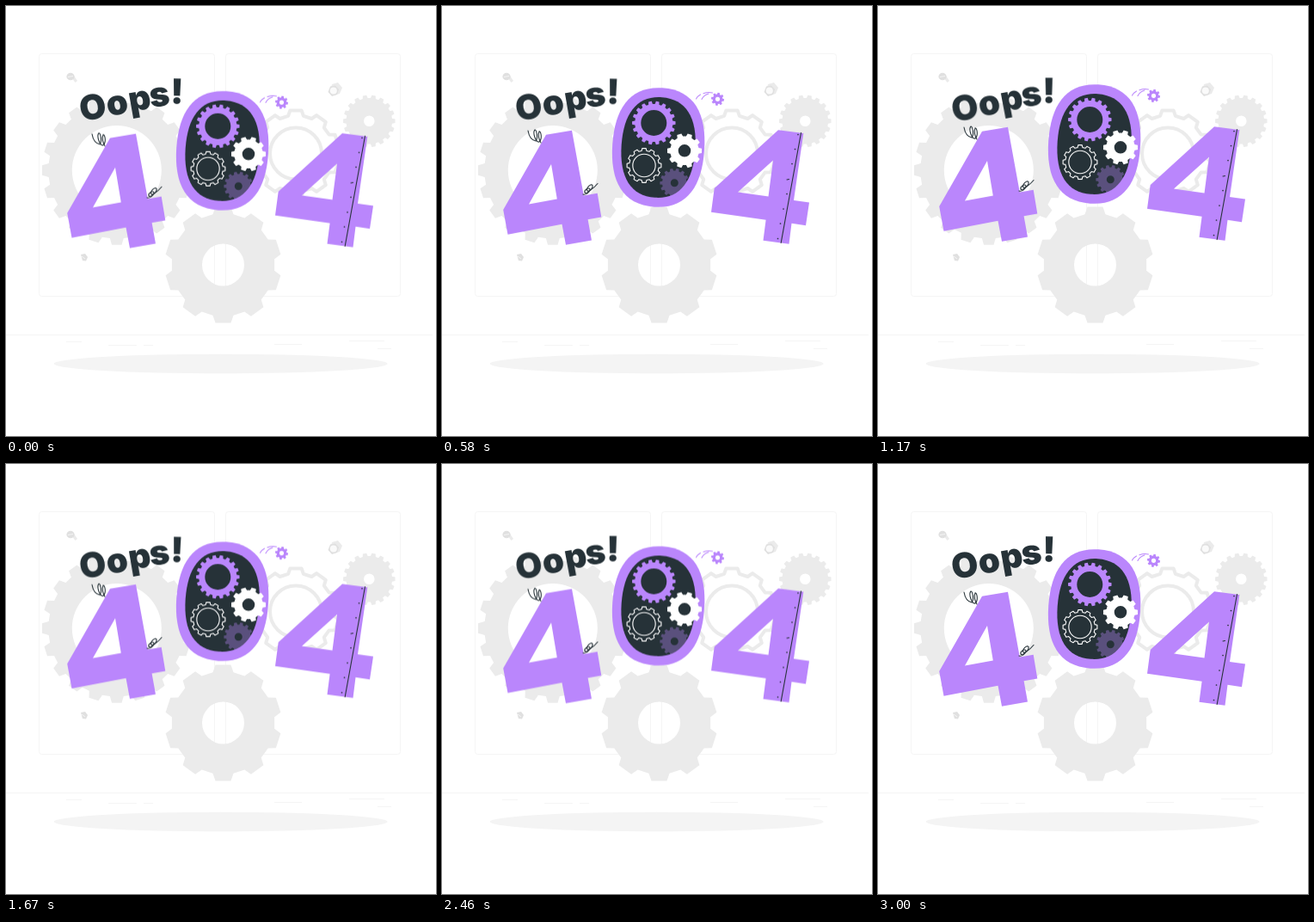
An HTML page for the animation above (3040 ms loop, 500 px wide and 500 px high).

```html
<!DOCTYPE html>
<html lang="en">
<head>
<meta charset="utf-8">
<title>404</title>
<style>
  html, body { margin: 0; width: 100%; height: 100%; overflow: hidden; background: #fff; }
  svg { display: block; width: 100vw; height: 100vh; }
  .float { animation: float 3.04s linear -40ms infinite; }
  .sway { animation: sway 1.52s linear -40ms infinite; transform-origin: 144.5px 108.5px; }
  .sway text { font: 900 40px Inter, "Liberation Sans", sans-serif; text-anchor: middle; fill: #263238; }
  .faint { fill: none; stroke: #f5f5f5; stroke-width: 1; }
  .purple { fill: #ba86fc; }
  .ink { fill: none; stroke: #263238; stroke-linecap: round; }
  .trail { fill: none; stroke: #ba86fc; stroke-width: 1.1; stroke-linecap: round; }
  @keyframes float { 50% { transform: translateY(-10px); } }
  @keyframes sway { 25% { transform: rotate(1deg); } 75% { transform: rotate(-1deg); } }
</style>
</head>
<body>
<svg viewBox="0 0 500 500">
  <g class="faint">
    <rect x="38.5" y="55.5" width="204" height="282" rx="3"/>
    <rect x="255.5" y="55.5" width="203" height="282" rx="3"/>
    <path d="M0 382.5H496"/>
    <path d="M70 390.5H88M119 394.5H152M160 394.5H171M312 393.5H344M399 389.5H440M432 398.5H448"/>
  </g>
  <ellipse cx="249.7" cy="416" rx="194" ry="11.3" fill="#f4f4f4"/>
  <g id="back"></g>

  <g fill="#e0e0e0">
    <path d="M76 83L79 81L83 87L80.500 89Z" fill="#ebebeb"/>
    <ellipse cx="75" cy="82" rx="4.600" ry="4.300"/>
    <path d="M72 82.500L78 81.500" stroke="#f5f5f5"/>
    <path d="M379 91L386 89L391 95L388 102L381 104L377 99Z" fill="#ebebeb"/>
    <path d="M377 93.500L383 92.500L387 97L385 103L379 105L374.500 100Z"/>
    <circle cx="380.800" cy="98.500" r="4" fill="#fafafa"/>
    <path d="M87 289L92 288L95 292L93 296.500L89 296Z"/>
    <path d="M88 291L92 294" stroke="#f5f5f5"/>
  </g>

  <g class="sway">
    <text transform="translate(103.5 131.5) rotate(-11)">O</text>
    <text transform="translate(131.5 126) rotate(-11)">o</text>
    <text transform="translate(157.5 121) rotate(-10)">p</text>
    <text transform="translate(180 116.5) rotate(-7)">s</text>
    <text transform="translate(198.5 113.5) rotate(1)">!</text>
  </g>

  <g class="float">
    <g class="purple" fill-rule="evenodd">
      <path d="M121 153.800L151 148.800L164.800 224.500L180.700 221.700L185.300 249.500L169.600 252.300L174 276.500L144 281.700L139.500 257.700L76.500 269.700L71.200 241ZM127 188L101 234.500L133.800 228.500Z"/>
      <path d="M391 148.300L420.300 152L409 230L427 232.500L423 259.200L406.500 256.800L403.500 280.700L373.500 276.700L376.600 252.700L313 243.800L316.700 216ZM385 183.500L344 220.500L379.500 225.500Z"/>
    </g>
    <g class="ink" stroke-width="1.1">
      <path d="M100 149C101 155 104 160 109 161C112 158 110 148 108 148C105 151 109 163 113 162C117 159 115 149 113 150C111 154 113 160 115 163"/>
      <path d="M181 210.500C177 215 172 220 169 219C167 216 173 210 175 212.500C176 217 168 223 166 221C165 218 171 214 172 217C172 221 167 224 164 223"/>
      <path d="M417.500 151.500L394.200 279.500"/>
      <path d="M401 206L403.500 205.500"/>
      <path d="M414 153.500h.01M410.500 170.500h.01M407 187.500h.01M401 222.500h.01M397 240h.01M393.500 257h.01M390.500 274.500h.01" stroke-width="1.700"/>
    </g>
    <g transform="translate(251.6 168.5) rotate(4)">
      <path class="purple" d="M0 -69.300C37 -69.300 53.500 -43 53.500 0S37 69.300 0 69.300S-53.500 43 -53.500 0S-37 -69.300 0 -69.300Z"/>
      <path fill="#263238" d="M0 -58.500C28 -58.500 43 -38 43 0S28 58.500 0 58.500S-43 38 -43 0S-28 -58.500 0 -58.500Z"/>
    </g>
    <g id="front"></g>
    <path class="trail" d="M295.500 112Q297 109 300.500 107M302 112.500Q304.500 107.500 310 106M304 105.800Q309 103.800 314.500 105"/>
  </g>
</svg>
<script>
  const NS = "http://www.w3.org/2000/svg";

  // Toothed outline with a round hole; phase is the angle of one tooth in degrees.
  function gearPath(x, y, n, tip, root, hole, phase) {
    const step = 2 * Math.PI / n;
    const pts = [];
    for (let i = 0; i < n; i++) {
      const a = phase * Math.PI / 180 + i * step;
      for (const [r, k] of [[root, -.32], [tip, -.21], [tip, .21], [root, .32]]) {
        const b = a + k * step;
        pts.push((x + r * Math.cos(b)).toFixed(2) + " " + (y + r * Math.sin(b)).toFixed(2));
      }
    }
    const arc = `a${hole} ${hole} 0 1 0 `;
    return `M${pts.join("L")}ZM${x - hole} ${y}${arc}${2 * hole} 0${arc}${-2 * hole} 0Z`;
  }

  function gear(layer, shape, attrs) {
    const p = document.createElementNS(NS, "path");
    p.setAttribute("d", gearPath(...shape));
    const all = { "fill-rule": "evenodd", "stroke-linejoin": "round", ...attrs };
    for (const key in all) p.setAttribute(key, all[key]);
    document.getElementById(layer).append(p);
  }

  const grey = "#ebebeb", purple = "#ba86fc";
  gear("back", [128.8, 191, 20, 87, 79.5, 52, 0], { fill: grey });
  gear("back", [252.5, 301, 10, 68, 60, 24.5, 18], { fill: grey });
  gear("back", [337, 171.5, 10, 50.5, 44.5, 30, 18], { fill: "none", stroke: grey, "stroke-width": 4 });
  gear("back", [422.3, 133.8, 18, 30.3, 26.8, 6.3, 0], { fill: grey });

  gear("front", [246.3, 140, 18, 25.3, 22, 15, 0], { fill: purple });
  gear("front", [282, 172.3, 10, 20.2, 16.8, 7.3, 0], { fill: "#fff" });
  gear("front", [235, 189.5, 12, 20, 17.3, 13.2, 0], { fill: "none", stroke: "#fff", "stroke-width": 1.1 });
  gear("front", [270.3, 209.8, 14, 17, 14.3, 4.5, 0], { fill: purple, opacity: .35 });
  gear("front", [320.5, 112.3, 8, 7.6, 5.8, 2.6, 10], { fill: purple });
</script>
</body>
</html>
```
